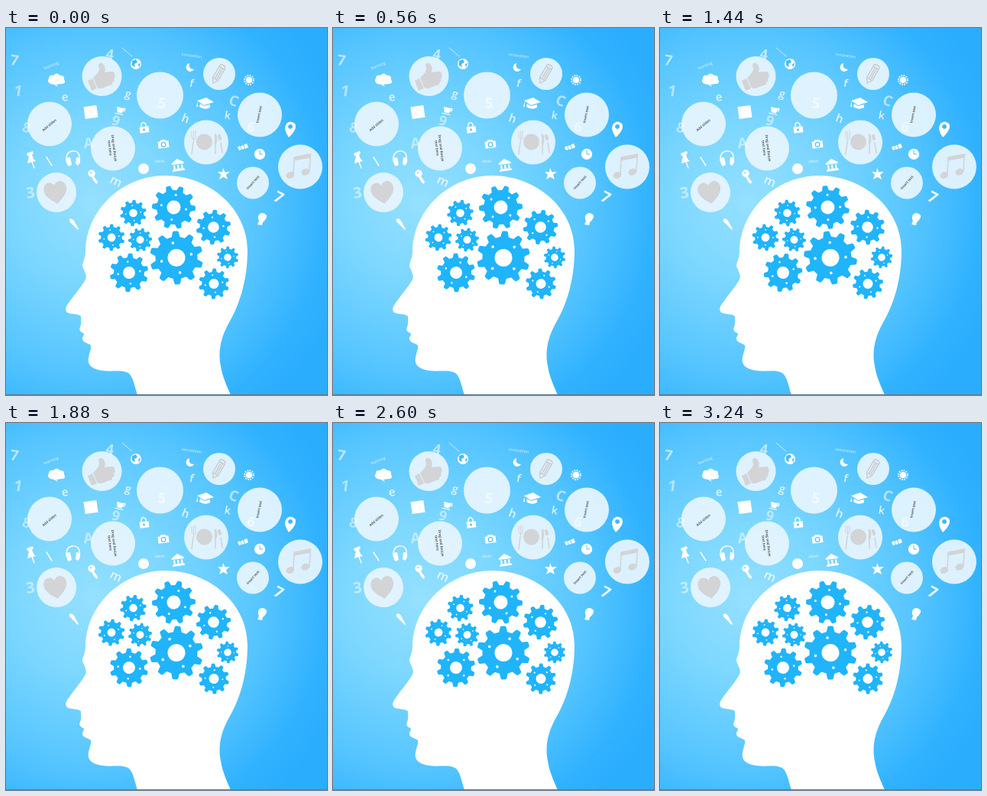
Animation of 420 by 480 pixels, one loop 3.28 s. Source, as an HTML page:

```html
<!DOCTYPE html>
<html lang="en">
<head>
<meta charset="utf-8">
<style>
  html, body { margin: 0; width: 100%; height: 100%; overflow: hidden; background: #2bb0fd; }
  svg { display: block; width: 420px; height: 480px; }
  .note { font: 600 4.6px "Open Sans", Arial, sans-serif; text-anchor: middle; fill: #444; }
  .word { font: 600 5.2px "Open Sans", Arial, sans-serif; text-anchor: middle; fill: #fff; opacity: .65; }
  .glyph { font-family: "Open Sans", Lato, sans-serif; text-anchor: middle; fill: #fff; }
  .line { fill: none; stroke: #fff; stroke-width: 1.4; stroke-linecap: round; }
  .grey { fill: #d3d4d6; }
</style>
</head>
<body>
<svg viewBox="0 0 420 480">
  <defs>
    <radialGradient id="sky" gradientUnits="userSpaceOnUse" cx="115" cy="230" r="345">
      <stop offset="0" stop-color="#95e0ff"/>
      <stop offset=".3" stop-color="#7cd7ff"/>
      <stop offset=".65" stop-color="#54c4ff"/>
      <stop offset=".88" stop-color="#31b2ff"/>
      <stop offset="1" stop-color="#2badfe"/>
    </radialGradient>
  </defs>
  <rect width="420" height="480" fill="url(#sky)"/>
  <g id="discs" fill="#e5f5ff" fill-opacity=".95"></g>

  <g class="grey">
    <path d="M107 69L113 66 119 79 112 82ZM114 65Q121 59 122 54L121 48Q123 44 127 47Q131 51 129 58L138 57Q143 57 142 61Q144 63 141 66Q143 69 139 71Q140 75 135 75L125 79Q121 80 119 77Z"/>
    <path transform="rotate(-10 65 215)" d="M65 230C58 224 50 219 50 210C51 199 62 199 65 206C68 199 79 199 80 210C80 219 72 224 65 230Z"/>
    <circle cx="259.500" cy="149" r="10.500"/>
    <g transform="rotate(-2 385 181)">
      <ellipse cx="371.500" cy="192" rx="5.500" ry="4.300" transform="rotate(-18 371.500 192)"/>
      <ellipse cx="391.500" cy="188.500" rx="5.500" ry="4.300" transform="rotate(-18 391.500 188.500)"/>
      <path d="M375.500 192L377.500 169 399 165.500 396.500 189" fill="none" stroke="#d3d4d6" stroke-width="1.600"/>
      <path d="M377.500 169L399 165.500V170L377 173.500Z"/>
    </g>
    <g transform="translate(278 60) rotate(-60)" fill="none" stroke="#cccdcf" stroke-width="1.500" stroke-linejoin="round">
      <path d="M-14 0L-8-4H10Q13-4 13 0T10 4H-8ZM-8-4V4M9-4V4M-7-1H9M-7 1.500H9"/>
    </g>
    <g fill="none" stroke="#d3d4d6" stroke-linecap="round">
      <path stroke-width="1.600" d="M245 149L243 165M274 140V164M281 150L283 163"/>
      <path stroke-width="1" d="M243 135V143Q246 149 248 143V134M245.500 135V149"/>
      <path stroke-width="2.800" d="M274 140Q276 145 274 151"/>
      <path stroke-width="4" d="M279 141L280 145"/>
    </g>
  </g>

  <g id="type"></g>

  <g fill="#fff">
    <path d="M58 73Q53 70 56 66Q56 61 62 62Q66 57 71 62Q77 62 76 67Q79 73 73 73L66 74 68 77 63 74Z"/>
    <rect x="102.500" y="102" width="17" height="16" transform="rotate(-8 111 110)"/>
    <circle cx="180" cy="184" r="7"/>
    <circle cx="170" cy="47" r="7"/>
    <path fill="#45bafd" d="M165 43L170 41 172 45 168 47 169 51 165 49ZM173 47L176 46 174 52Z"/>
    <path d="M240 46A5.500 5.500 0 1 0 246 54Q238 54 240 46Z"/>
    <path d="M250 95L262 91 272 97 259 101ZM254 99L259 102 267 100V104Q260 108 253 103ZM251 96L249 103H251Z"/>
    <path d="M284 183L286.500 188.500 293 188 288 192 290 198 284.500 195 279 198 281 192 277 188 283 188.500Z"/>
    <path fill-rule="evenodd" d="M370 143Q362 132 367 125Q372 120 378 125Q382 132 370 143ZM372 126A3 3 0 1 0 372.100 126Z"/>
    <circle cx="332" cy="165" r="7.200"/>
    <path d="M332 160V165H336" fill="none" stroke="#55bffa"/>
    <path d="M331 252Q328 247 332 243Q337 240 341 245Q342 249 336 254L335 258 329 257Z"/>
    <g transform="rotate(-7 206 152)">
      <path d="M199 148H202L203 146H209L210 148H213V157H199Z"/>
      <circle cx="206" cy="152.500" r="2.800" fill="none" stroke="#59c2fc" stroke-width="1.300"/>
    </g>
    <path d="M175 129H187V137H175Z" transform="rotate(-7 181 133)"/>
    <path class="line" d="M177 129V126Q179 121 183 126V129"/>
    <circle cx="180.500" cy="133" r="1.500" fill="#5bc2fc"/>
    <path d="M144 104H154L152 111H146ZM143 112H154V113H143Z" transform="rotate(12 149 109)"/>
    <path class="line" d="M155 105Q157 107 154 109" stroke-width="1"/>
    <g transform="translate(225 179) rotate(-8)">
      <path d="M-8-3L0-8 8-3V-1H-8ZM-7 5H7V6H8V8H-8V6H-7Z"/>
      <path d="M-5 0V5M0 0V5M5 0V5" stroke="#fff" stroke-width="2.200"/>
    </g>
    <path d="M27 164L35 161 36 164 34 166 36 171 39 174 28 177 29 172 30 168 28 167Z"/>
    <path class="line" d="M34 175L37 183M53 169L60 180"/>
    <path class="line" d="M79 174Q78 162 87 161Q97 160 96 172"/>
    <path d="M79 170L84 169 86 179 82 181Q78 177 79 170ZM92 169L97 170Q98 177 94 180L91 178Z"/>
    <path fill-rule="evenodd" d="M112 195A4.800 4.800 0 1 1 115 194L120 201 119 204 116 202ZM111 188A1.200 1.200 0 1 0 111.100 188Z"/>
    <path d="M83 250Q86 248 89 252L95 263 94 264 85 255Q82 253 83 250Z"/>
    <path d="M303 156L306 154 308 159 305 160ZM307 155L310 153 312 158 309 159ZM311 153L315 151 317 156 313 158Z"/>
    <circle cx="318" cy="68" r="4.300"/>
    <circle cx="318" cy="68" r="6" fill="none" stroke="#fff" stroke-width="2" stroke-dasharray="1.570 1.570"/>
    <path class="line" d="M152 26L165 37" opacity=".4"/>
  </g>

  <path fill="#fff" d="M172 480C168 468 167 459 162 453C155 446 139 450 125 448C112 446 106 440 108 431C109 425 112 419 111 415C108 412 101 412 100 407C99 404 104 401 101 399C97 397 95 395 97 391C99 386 98 381 98 377C94 373 85 375 80 372C77 369 78 365 81 361C88 350 98 340 104 329C107 323 101 316 100 311C100 306 104 301 104 292C105 237 153 193 208 193C266 193 316 236 316 291C316 330 305 363 292 385C279 408 278 426 281 442C283 456 289 468 294 480Z"/>
  <g id="gears" fill="#20b4fb"></g>
  <rect y="479" width="420" height="1" fill="#607f92"/>
</svg>
<script>
const LOOP = 3280, STEP = 40, TURN = 180;
const $ = id => document.getElementById(id);

// x, y, radius
$('discs').innerHTML = [
  [125.5, 63, 26], [201.5, 88, 30.5], [279, 60, 21], [57, 125.5, 29], [140, 157.5, 29],
  [262, 149.5, 29], [332, 113.5, 29], [385, 181.5, 29], [323, 202.5, 21], [66, 215, 26]
].map(([x, y, r]) => `<circle cx="${x}" cy="${y}" r="${r}"/>`).join('');

// text, x, y, size, tilt, opacity
const glyphs = [
  ['7', 11, 42, 19, 8, .6], ['1', 16, 82, 20, 8, .5], ['8', 27, 130, 18, 15, .5],
  ['3', 32, 215, 20, -8, .5], ['4', 136, 34, 18, 8, .6], ['A', 108, 150, 19, -5, .5],
  ['9', 144, 121, 18, 15, .5], ['5', 204, 98, 19, 8, .65], ['C', 298, 95, 19, 20, .55],
  ['6', 321, 129, 18, 15, .5], ['7', 357, 221, 20, 28, .9], ['e', 77, 90, 15, -8, .8],
  ['g', 160, 86, 14, 18, .8], ['f', 243, 72, 14, 12, .8], ['h', 235, 118, 15, 20, .8],
  ['k', 290, 114, 14, 10, .8], ['m', 144, 200, 16, 25, .75]
];
const label = (cls, text, x, y, tilt) =>
  `<text class="${cls}" transform="translate(${x} ${y}) rotate(${tilt})" dy=".35em">${text}</text>`;

$('type').innerHTML = glyphs.map(([c, x, y, size, tilt, alpha]) =>
  `<text class="glyph" transform="translate(${x} ${y}) rotate(${tilt})" dy=".36em"
    font-size="${size}" font-weight="${/\d|[A-Z]/.test(c) ? 700 : 600}" opacity="${alpha}">${c}</text>`
).join('') + [
  ['note', 'Add slides', 56.5, 127, -40],
  ['note', 'Drag and Resize', 141.5, 157, 83],
  ['note', 'text here', 136, 157, 83],
  ['note', 'Insert text', 331, 113, -78],
  ['note', 'Insert text', 323, 202, -48],
  ['word', 'learning', 59, 49, -22],
  ['word', 'innovation', 243, 36, 8],
  ['word', 'ideas', 201, 174, -5]
].map(a => label(...a)).join('');

const polar = (r, a) => `${(r * Math.sin(a)).toFixed(2)} ${(-r * Math.cos(a)).toFixed(2)}`;
const ring = (r, x = 0, y = 0) =>
  `M${x - r} ${y}a${r} ${r} 0 1 0 ${2 * r} 0a${r} ${r} 0 1 0 ${-2 * r} 0Z`;

function gearPath(R, hole, teeth = 10) {
  const pitch = 2 * Math.PI / teeth, root = R * .79, points = [];
  for (let i = 0; i < teeth; i++) {
    for (const [r, k] of [[root, -.31], [R * .97, -.18], [R, -.12], [R, .12], [R * .97, .18], [root, .31]])
      points.push(polar(r, (i + k) * pitch));
  }
  let d = `M${points.join('L')}Z` + ring(hole);
  for (let i = 0; i < 4; i++) {
    const a = i * Math.PI / 2 - .2;
    d += ring(R * .052, R * .57 * Math.sin(a), -R * .57 * Math.cos(a));
  }
  return d;
}

// x, y, radius, hole, start angle, direction; meshing neighbours turn opposite ways
const gears = [
  [223, 300.5, 35, 11.5, -2, -1], [219.5, 234.5, 28.5, 9, 21, 1],
  [271.5, 260.5, 22.8, 7.3, 5, -1], [166.5, 242, 17.3, 5.3, 4, -1],
  [138, 274, 17.5, 5.4, 1, -1], [175.5, 277, 15.5, 5, 14, 1],
  [161, 320, 25.3, 8, 4, 1], [290, 300, 14.3, 4.8, 1, 1],
  [272, 334.5, 20, 6.5, 2, 1]
];
$('gears').innerHTML = gears.map(([, , r, hole]) =>
  `<path fill-rule="evenodd" d="${gearPath(r, hole)}"/>`).join('');
const wheels = [...$('gears').children];

const start = performance.now();
function draw(now) {
  const t = Math.floor(Math.max(0, now - start) % LOOP / STEP) * STEP;
  wheels.forEach((wheel, i) => {
    const [x, y, , , phase, dir] = gears[i];
    wheel.setAttribute('transform', `translate(${x} ${y}) rotate(${phase + dir * TURN * t / LOOP})`);
  });
  requestAnimationFrame(draw);
}
draw(start);
</script>
</body>
</html>
```
